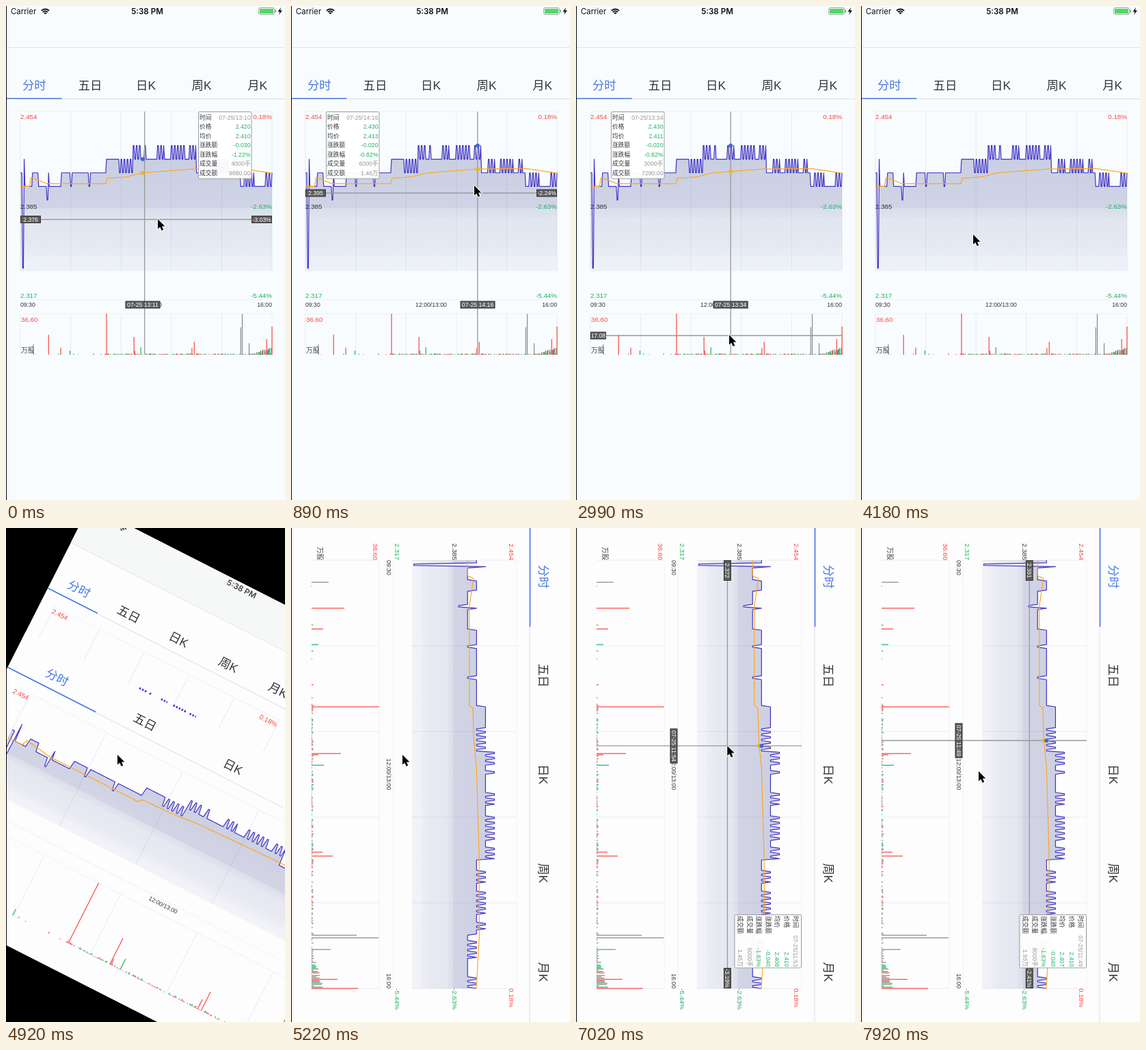
An HTML page with a canvas that plays this animation: 408x721 px, repeating every 8 s.

```html
<!DOCTYPE html>
<html lang="zh">
<head>
<meta charset="utf-8">
<style>
  html, body { margin: 0; height: 100%; overflow: hidden; background: #000; }
  canvas { display: block; width: 408px; height: 721px; }
</style>
</head>
<body>
<canvas id="stage"></canvas>
<script>
const STAGE_W = 408, STAGE_H = 721, LOOP = 8000, MINUTES = 330;
const HIGH = 2.454, LOW = 2.317, CLOSE = 2.45, MAX_VOLUME = 366;
const RED = '#fb4643', GREEN = '#21b163', GRAY = '#848a8a', DARK = '#333538', BLUE = '#4a78e6';
const SANS = '"Liberation Sans", "Noto Sans CJK SC", "Noto Sans CJK", sans-serif';
const UI = 'Inter, sans-serif';

const canvas = document.getElementById('stage');
const ctx = canvas.getContext('2d');
const ratio = window.devicePixelRatio || 1;
canvas.width = STAGE_W * ratio;
canvas.height = STAGE_H * ratio;

const PORTRAIT = {
  bg: '#f8fcfe', tabY: 135, left: 21, right: 389, box: 154, top: 156, bottom: 428.4,
  labelInset: 5.5, timeY: 436, volTop: 449, volBottom: 509, volLabelY: 457, unitY: 502, outside: false
};
const LANDSCAPE = {
  bg: '#fdfdfe', tabY: 58.5, left: 47, right: 672, box: 78, top: 79, bottom: 258.6,
  labelInset: 6, timeY: 265, volTop: 279, volBottom: 378, volLabelY: 284.5, unitY: 365, outside: true
};

// ---- data, one value per trading minute ----
const random = n => { const s = Math.sin(n * 12.9898 + 4.1) * 43758.5453; return s - Math.floor(s); };
const lerp = (a, b, k) => a + (b - a) * k;

function sample(keys, at) {
  let n = 1;
  while (n < keys.length - 1 && keys[n][0] < at) n++;
  const a = keys[n - 1], b = keys[n];
  const k = Math.min(1, Math.max(0, (at - a[0]) / (b[0] - a[0])));
  return a.map((v, c) => lerp(v, b[c], k));
}

// [first minute, cents above 2.40]
const LEVELS = [[0, 1], [3, -6], [5, 2], [6, 0], [16, 1], [24, 0], [35, -1], [37, 1], [38, 0], [54, 1],
  [66, 0], [68, 1], [90, 0], [92, 1], [113, 2], [231, 1], [289, 0]];
// [first, last] minute of each burst, in which the price flips by a cent every two minutes
const BURSTS = [[130, 147], [148, 157], [163, 166], [180, 188], [198, 215], [222, 230],
  [240, 248], [256, 272], [280, 284], [294, 306], [322, 330]];
const AVERAGE = [[0, 2.4], [12, 2.4], [14, 2.4066], [35, 2.402], [112, 2.402], [114, 2.406],
  [139, 2.407], [160, 2.41], [226, 2.4128], [288, 2.4132], [330, 2.4098]];
// thousands traded in the minutes that stand out
const PEAKS = { 17: 92, 37: 178, 53: 63, 65: 37, 113: 366, 139: 8, 149: 159, 150: 37, 158: 67, 160: 4,
  184: 3, 214: 2, 225: 59, 226: 6, 228: 115, 289: 244, 291: 363, 300: 103, 323: 140, 330: 251 };

function priceAt(i) {
  const level = LEVELS.findLast(l => l[0] <= i)[1];
  const burst = BURSTS.find(([a, b]) => i >= a && i <= b);
  const flip = burst && (i - burst[0]) % 4 < 2 ? (i < 148 ? -1 : 1) : 0;
  return 2.4 + (level + flip) / 100;
}

function volumeAt(i) {
  if (PEAKS[i]) {
    const color = [17, 289, 291, 300].includes(i) ? GRAY : [65, 158].includes(i) ? GREEN : RED;
    return { color, size: PEAKS[i] };
  }
  const color = [RED, GREEN, GRAY][Math.floor(random(i + 500) * 3)];
  const busy = random(i) < (i > 110 ? 0.7 : 0.1);
  const closing = random(i + 70) * Math.max(0, i - 304) * 3;
  return { color, size: Math.round(busy * (1 + random(i + 900) * 11) + closing) };
}

const minutes = Array.from({ length: MINUTES + 1 }, (_, i) =>
  ({ price: priceAt(i), average: sample(AVERAGE, i)[1], volume: volumeAt(i) }));

function clock(i) {
  const m = 570 + i + (i >= 150 ? 60 : 0);
  return String(Math.floor(m / 60)).padStart(2, '0') + ':' + String(m % 60).padStart(2, '0');
}
const wan = (n, digits) => n >= 10000 ? (n / 10000).toFixed(2) + '万' : n.toFixed(digits);
const percent = price => ((price / CLOSE - 1) * 100).toFixed(2) + '%';

// ---- drawing helpers ----
function text(s, x, y, color, size, align = 'left', font = SANS, weight = 400) {
  ctx.font = `${weight} ${size}px ${font}`;
  ctx.textAlign = align;
  ctx.fillStyle = color;
  ctx.fillText(s, x, y + size * 0.36);
}
function trace(points) {
  ctx.beginPath();
  points.forEach(([x, y]) => ctx.lineTo(x, y));
}
function stroke(points, color, width = 1.2) {
  trace(points);
  ctx.strokeStyle = color;
  ctx.lineWidth = width;
  ctx.lineJoin = 'round';
  ctx.stroke();
}
function fill(points, color) {
  trace(points);
  ctx.fillStyle = color;
  ctx.fill();
}
function line(x1, y1, x2, y2, color, width = 1) {
  stroke([[x1, y1], [x2, y2]], color, width);
}
function rect(x, y, w, h, color) {
  ctx.fillStyle = color;
  ctx.fillRect(x, y, w, h);
}
function dot(x, y, color) {
  ctx.fillStyle = color;
  ctx.beginPath();
  ctx.arc(x, y, 3, 0, 7);
  ctx.fill();
}
function tag(s, x, y, w) {
  rect(x, y - 5.5, w, 11, '#333');
  rect(x + 1, y - 4.5, w - 2, 9, '#5c5c5c');
  text(s, x + w / 2, y, '#fff', 8.7, 'center');
}

const xOf = (L, i) => lerp(L.left, L.right, i / MINUTES);
const yOf = (L, price) => L.top + (HIGH - price) / (HIGH - LOW) * (L.bottom - L.top);

function drawStatus(width, color) {
  text('Carrier', 7, 8, color, 11.4, 'left', UI);
  ctx.strokeStyle = color;
  ctx.lineWidth = 1.9;
  [2, 5, 8].forEach(r => {
    ctx.beginPath();
    ctx.arc(57.5, 12.5, r, -Math.PI * 0.75, -Math.PI * 0.25);
    ctx.stroke();
  });
  text('5:38 PM', width / 2 + 2.5, 8, color, 11.6, 'center', UI, 600);
  const x = width - 39;
  ctx.lineWidth = 0.8;
  ctx.strokeStyle = '#8a8f8c';
  ctx.beginPath();
  ctx.roundRect(x + 0.5, 2.5, 23, 10, 2.5);
  ctx.stroke();
  rect(x + 2, 4, 20, 7, '#4cd964');
  rect(x + 24.5, 5.5, 1.5, 4, '#8a8f8c');
  fill([[x + 33, 2], [x + 28.5, 8.5], [x + 31.5, 8.5], [x + 30, 13], [x + 35, 6.5], [x + 32, 6.5]], color);
}

function drawTabs(L, pageWidth, lineWidth) {
  const w = pageWidth / 5;
  line(0, L.tabY + 0.5, lineWidth, L.tabY + 0.5, '#dcdfe3');
  line(0, L.tabY, w, L.tabY, BLUE, 1.6);
  ['分时', '五日', '日K', '周K', '月K'].forEach((s, n) =>
    text(s, w * (n + 0.5) + (L.outside ? -1 : 0.5), L.tabY - 19.5, n ? DARK : BLUE, 17.4, 'center'));
}

function drawChart(L) {
  const { left, right, box, top, bottom, volTop, volBottom } = L;
  const floor = yOf(L, 2.338);
  for (let n = 0; n <= 5; n++) {
    const x = lerp(left, right, n / 5);
    line(x, box, x, floor, '#e8ebf1');
    line(x, volTop, x, volBottom, '#e8ebf1');
  }
  [box, bottom, volTop].forEach(y => line(left, y, right, y, '#eef1f5'));

  const prices = minutes.map((m, i) => [xOf(L, i), yOf(L, m.price)]);
  const shade = ctx.createLinearGradient(0, yOf(L, 2.43), 0, floor);
  let from = 0;
  for (const [to, alpha] of [[0.5, 0.28], [0.57, 0.18], [0.81, 0.135], [0.885, 0.1], [1, 0.07]]) {
    shade.addColorStop(from, `rgba(75,85,150,${alpha})`);
    shade.addColorStop(to, `rgba(75,85,150,${alpha * 0.85})`);
    from = to;
  }
  fill([[left, floor], ...prices, [right, floor]], shade);
  stroke(prices, '#4034c6');
  stroke(minutes.map((m, i) => [xOf(L, i), yOf(L, m.average)]), '#ffa71f');

  minutes.forEach(({ volume }, i) => {
    const h = volume.size / MAX_VOLUME * (volBottom - volTop);
    rect(xOf(L, i) - 0.6, volBottom - h, 1.2, h, volume.color);
  });

  const [startAlign, endAlign] = L.outside ? ['right', 'left'] : ['left', 'right'];
  const middle = (top + bottom) / 2;
  [[HIGH, RED, RED, top + L.labelInset], [2.385, DARK, GREEN, middle], [LOW, GREEN, GREEN, bottom - L.labelInset]]
    .forEach(([price, startColor, endColor, y]) => {
      text(price.toFixed(3), left, y, startColor, 9.8, startAlign);
      text(price === 2.385 ? '-2.63%' : price === LOW ? '-5.44%' : '0.18%', right, y, endColor, 9.8, endAlign);
    });
  text('09:30', left, L.timeY, DARK, 8.7);
  text('12:00/13:00', (left + right) / 2, L.timeY, DARK, 8.7, 'center');
  text('16:00', right, L.timeY, DARK, 8.7, 'right');
  const inset = L.outside ? 0 : 1;
  text('36.60', left + inset, L.volLabelY, RED, 9.8, startAlign);
  text('万股', left + inset, L.unitY, '#444', 9.8, startAlign);
}

function drawCross(L, x, y, index) {
  const { left, right, box, volTop, volBottom } = L;
  const m = minutes[Math.floor(index)], dotX = xOf(L, index);
  line(x, box, x, volBottom, '#999', 1.3);
  line(left, y, right, y, '#999', 1.3);
  dot(dotX, yOf(L, m.average), '#efb520');
  dot(dotX, yOf(L, m.price), '#4668d0');
  tag('07-25 ' + clock(Math.ceil(index)), dotX - 25.5, L.timeY, 51);
  if (y > volTop) {
    tag(((volBottom - y) / (volBottom - volTop) * 36.6).toFixed(2), left, y, 23);
  } else if (y < L.bottom) {
    const price = HIGH - (y - L.top) / (L.bottom - L.top) * (HIGH - LOW);
    tag(price.toFixed(3), left, y, 30);
    tag(percent(price), right - 30, y, 30);
  }
}

function drawTooltip(L, index) {
  const i = Math.floor(index), { price, average, volume } = minutes[i];
  const shares = volume.size * 1000;
  const x = i < MINUTES / 2 ? L.right - 108 : L.left + 30, y = L.box;
  ctx.fillStyle = 'rgba(255,255,255,.95)';
  ctx.strokeStyle = '#9a9d9f';
  ctx.lineWidth = 1;
  ctx.beginPath();
  ctx.roundRect(x + 0.5, y + 0.5, 77.5, 97.5, 1.5);
  ctx.fill();
  ctx.stroke();
  [['时间', '07-25/' + clock(i), '#999'], ['价格', price.toFixed(3), GREEN], ['均价', average.toFixed(3), GREEN],
    ['涨跌额', (price - CLOSE).toFixed(3), GREEN], ['涨跌幅', percent(price), GREEN],
    ['成交量', wan(shares, 0) + '手', '#999'], ['成交额', wan(shares * price, 2), '#999']]
    .forEach(([label, value, color], n) => {
      const rowY = y + 8.5 + n * 13.5;
      text(label, x + 2, rowY, DARK, 8.7);
      text(value, x + 76.5, rowY, color, 8.7, 'right');
    });
}

function drawCursor(x, y) {
  const arrow = [[0, 0], [0, 14.5], [3.3, 11.5], [5.6, 16.8], [8.2, 15.7], [6, 10.6], [10.4, 10.4], [0, 0]]
    .map(([a, b]) => [x + a, y + b]);
  stroke(arrow, '#fff', 2.2);
  fill(arrow, '#000');
}

// [ms, cursor x, cursor y, minute under the cross, cross y on the page]
const MOVES = [
  [0, 222, 311, 160.5, 311.5], [440, 280, 304, 226, 305], [890, 268, 262, 226, 273],
  [1790, 255, 231, 214, 216.5], [2990, 224, 480, 184, 481], [3600, 224, 480, 184, 481],
  [4180, 163, 331, 150, 228], [5370, 163, 331, 150, 228], [5670, 180, 331, 150, 228],
  [6270, 180, 331, 150, 228], [7470, 246, 310, 139, 161.7], [7770, 246, 310, 139, 161.7],
  [7920, 172, 355, 139, 161.7]
];
const CROSS_LEAD = 16; // the vertical line runs ahead of its labels

// The picture only changes every 150 ms
function step(t) {
  const start = t < 3200 ? 140 : 120;
  return Math.max(0, start + Math.floor((t - start) / 150) * 150);
}

function draw(time) {
  const t = step(time);
  const [, cursorX, cursorY, minute, crossY] = sample(MOVES, t);
  const k = Math.min(1, Math.max(0, (t - 4758) / 440));
  const turn = (1 - Math.cos(k * Math.PI)) / 2;
  const width = lerp(STAGE_W, STAGE_H, turn), height = lerp(STAGE_H, STAGE_W, turn);

  ctx.setTransform(ratio, 0, 0, ratio, 0, 0);
  rect(0, 0, STAGE_W, STAGE_H, '#000');
  ctx.save();
  ctx.translate(STAGE_W / 2, STAGE_H / 2);
  ctx.rotate(turn * Math.PI / 2);
  ctx.translate(-width / 2, -height / 2);
  rect(0, 0, width, height, turn ? LANDSCAPE.bg : PORTRAIT.bg);

  if (turn < 1) {
    if (turn) rect(0, 0, width, 60, '#f6f7f7');
    drawStatus(width, turn ? '#444' : '#111');
    line(0, 60.5, width, 60.5, '#e2e5e8');
    drawTabs(PORTRAIT, STAGE_W, width);
    drawChart(PORTRAIT);
  }
  if (turn > 0) {
    ctx.globalAlpha = Math.min(1, turn * 5);
    ctx.translate(0, 294 * (1 - turn));
    rect(0, 0, STAGE_H, STAGE_W, LANDSCAPE.bg);
    drawTabs(LANDSCAPE, STAGE_H, STAGE_H);
    drawChart(LANDSCAPE);
    ctx.globalAlpha = 1;
  }
  const page = turn < 1 ? PORTRAIT : LANDSCAPE;
  if (t < 3700 || t >= 6420) drawCross(page, xOf(page, sample(MOVES, t + CROSS_LEAD)[3]), crossY, minute);
  if (t < 3700 || t >= 6270) drawTooltip(page, minute);
  ctx.restore();

  rect(0, 0, 1, STAGE_H, '#000');
  drawCursor(cursorX, cursorY);
}

const began = performance.now();
function tick() {
  draw((performance.now() - began) % LOOP);
  requestAnimationFrame(tick);
}
tick();
</script>
</body>
</html>
```
